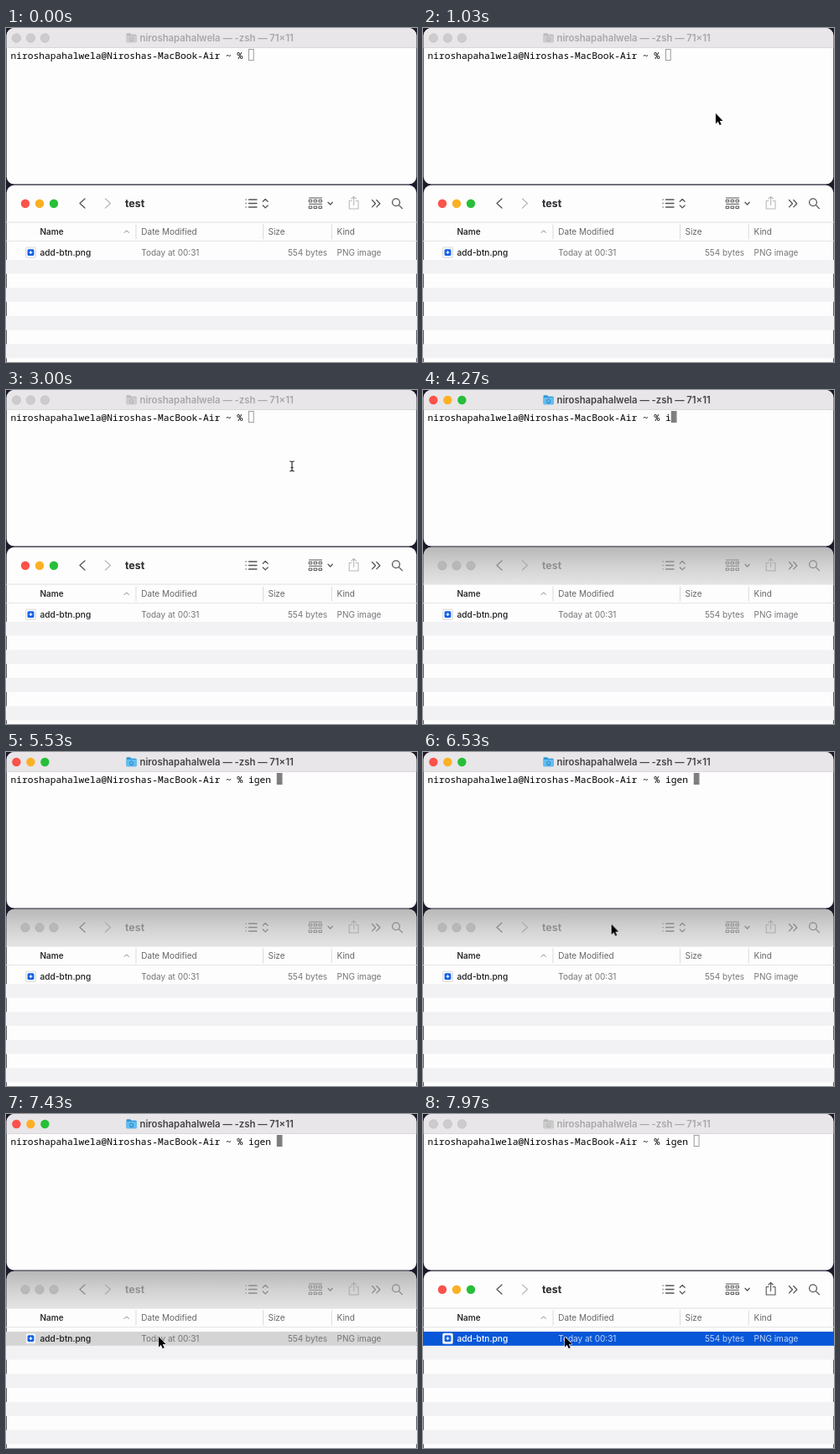
Recreate the animation shown at these times as an HTML page. Size 490 by 399 pixels, loop 8 s.

```html
<!DOCTYPE html>
<html lang="en">
<head>
<meta charset="utf-8">
<title>Terminal and file browser</title>
<style>
html, body { margin: 0; width: 100%; height: 100%; overflow: hidden; background: #1d1b2b; }
svg { display: block; width: 490px; height: 399px; }
text { font-family: Inter, Roboto, sans-serif; font-size: 10px; }
.mono { font-family: "Noto Sans Mono", "DejaVu Sans Mono", monospace; font-size: 11.25px; font-weight: 500; }
.bold { font-weight: 600; }
.line { fill: none; stroke: currentColor; stroke-width: 1.3; stroke-linecap: round; stroke-linejoin: round; }

/* every animation shares one 8 s clock with hard steps */
.term, .find, .title, .tools, .weak, .share, .caret, .grey, .blue, .name, .info, .arrow, .beam, .shown {
  animation: 8s step-end infinite;
}
.term { animation-name: term; }
.find { animation-name: find; }
.title { animation-name: title; }
.tools { animation-name: tools; }
.weak { animation-name: weak; }
.share { animation-name: share; }
.caret { animation-name: caret; }
.grey { animation-name: grey; }
.blue { animation-name: blue; }
.name { animation-name: name; }
.info { animation-name: info; }
.arrow { animation-name: arrow; }
.beam { animation-name: beam; }
.shown { animation-name: shown; }
.move { animation: move 8s linear infinite; }

@keyframes term { 0% { opacity: 0 } 40.4% { opacity: 1 } 94.6% { opacity: 0 } }
@keyframes find { 0% { opacity: 1 } 40.4% { opacity: 0 } 94.6% { opacity: 1 } }
@keyframes title { 0% { fill: #a9a7a9 } 40.4% { fill: #454345 } 94.6% { fill: #a9a7a9 } }
@keyframes tools { 0% { color: #555456 } 40.4% { color: #8c8b8c } 94.6% { color: #555456 } }
@keyframes weak { 0% { color: #b9b8ba } 40.4% { color: #adacad } 94.6% { color: #b9b8ba } }
@keyframes share { 0% { color: #b9b8ba } 40.4% { color: #adacad } 94.6% { color: #b9b8ba } 98.2% { color: #555456 } }
@keyframes caret {
  0% { transform: translateX(0) }
  52.9% { transform: translateX(6.75px) }
  55.6% { transform: translateX(13.5px) }
  57.6% { transform: translateX(20.25px) }
  60% { transform: translateX(27px) }
  63.2% { transform: translateX(33.75px) }
}
@keyframes grey { 0% { opacity: 0 } 90.6% { opacity: 1 } 94.6% { opacity: 0 } }
@keyframes blue { 0% { opacity: 0 } 94.6% { opacity: 1 } }
@keyframes name { 0% { fill: #1c1b1d } 94.6% { fill: #fff } }
@keyframes info { 0% { fill: #767577 } 94.6% { fill: #c3d6f8 } }
@keyframes arrow { 0% { opacity: 1 } 16.5% { opacity: 0 } 81% { opacity: 1 } }
@keyframes beam { 0% { opacity: 0 } 16.5% { opacity: 1 } 81% { opacity: 0 } }
@keyframes shown { 0% { opacity: 0 } 4% { opacity: 1 } 52.9% { opacity: 0 } 78% { opacity: 1 } }
@keyframes move {
  0%, 4% { transform: translate(500px, 250px); animation-timing-function: ease-out }
  10% { transform: translate(352px, 106px) }
  12.8% { transform: translate(349px, 102px) }
  22%, 78% { transform: translate(341px, 91px) }
  81.6% { transform: translate(225px, 205px); animation-timing-function: ease-out }
  87% { transform: translate(188px, 262px) }
  91.6%, 94% { transform: translate(182px, 266px) }
  99.6%, 100% { transform: translate(169px, 266px) }
}
</style>
</head>
<body>
<svg viewBox="0 0 490 399">
  <defs>
    <linearGradient id="shade" x1="0" y1="0" x2="0" y2="1">
      <stop offset="0" stop-color="#b8b7b8"/>
      <stop offset=".5" stop-color="#d2d1d2"/>
      <stop offset="1" stop-color="#e5e4e5"/>
    </linearGradient>
    <pattern id="stripes" y="276.8" width="490" height="33.6" patternUnits="userSpaceOnUse">
      <rect width="490" height="16.8" fill="#f2f1f3"/>
    </pattern>
    <clipPath id="termBox"><rect x=".7" width="488.6" height="186.6" rx="9"/></clipPath>
    <clipPath id="findBox"><rect x=".7" y="187.8" width="488.6" height="230" rx="9"/></clipPath>
    <g id="dots"><circle r="5.2"/><circle cx="17" r="5.2"/><circle cx="34" r="5.2"/></g>
    <g id="lights">
      <circle r="5.2" fill="#fb5249"/><circle cx="17" r="5.2" fill="#fbb024"/><circle cx="34" r="5.2" fill="#27bf38"/>
    </g>
    <g id="folder">
      <path d="M143.5 7.5q0-1.2 1.2-1.2h3.4l1.4 1.4h5q1.2 0 1.2 1.2v7.2q0 1.2-1.2 1.2h-9.8q-1.2 0-1.2-1.2z" fill="#3397d6"/>
      <rect x="143.5" y="9" width="12.2" height="8.3" rx="1.2" fill="#63bdf0"/>
      <path d="M147 13l2.6-2.3 2.6 2.3M148 13v2.5h3.2V13" fill="none" stroke="#267fb8" stroke-width=".9"/>
    </g>
  </defs>

  <g clip-path="url(#termBox)">
    <rect width="490" height="188" fill="#fefdfe"/>
    <rect width="490" height="23.5" fill="#e8e6e8"/>
    <rect y="23" width="490" height=".8" fill="#d5d3d5"/>
    <g class="find">
      <use href="#dots" x="12.4" y="12" fill="#cdcbcd" stroke="#bebcbe" stroke-width=".6"/>
      <use href="#folder" style="filter:grayscale(1)" opacity=".45"/>
    </g>
    <g class="term">
      <use href="#lights" x="12.4" y="12"/>
      <use href="#folder"/>
    </g>
    <text class="bold title" x="159.5" y="15.6" style="font-size:11.3px">niroshapahalwela — -zsh — 71×11</text>
    <text class="mono" x="5.5" y="36.5">niroshapahalwela@Niroshas-MacBook-Air ~ %</text>
    <text class="mono" x="289" y="36.5">igen</text>
    <g class="caret">
      <rect x="288.9" y="25" width="42" height="15" fill="#fefdfe"/>
      <rect class="find" x="289.4" y="25.4" width="5.8" height="13.2" fill="none" stroke="#929192" stroke-width=".9"/>
      <rect class="term" x="289" y="25" width="6.7" height="14" fill="#7f7e7f"/>
    </g>
  </g>

  <g clip-path="url(#findBox)">
    <rect y="187" width="490" height="212" fill="#fefdfe"/>
    <rect class="term" y="187" width="490" height="45" fill="url(#shade)"/>
    <g class="find"><use href="#lights" x="23" y="209.7"/></g>
    <g class="term"><use href="#dots" x="23" y="209.7" fill="#b9b8b9" stroke="#aaa9aa" stroke-width=".6"/></g>

    <g class="tools">
      <text class="bold" x="142" y="214" style="font-size:12.6px" fill="currentColor">test</text>
      <g class="line">
        <path d="M94 204l-6 5.5 6 5.5M384 208.3l2.6 2.7 2.6-2.7M436.5 205.5l4 4.2-4 4.2M441.8 205.5l4 4.2-4 4.2"/>
        <path d="M289.5 205h9.5M289.5 209.5h9.5M289.5 214h9.5M286 205h.1M286 209.5h.1M286 214h.1"/>
        <path d="M306.3 207.3l2.9-2.9 2.9 2.9M306.3 212l2.9 2.9 2.9-2.9"/>
        <circle cx="465" cy="208.2" r="4.4"/><path d="M468.4 211.6l4 4"/>
        <g stroke-width="1">
          <path d="M361.5 203h15M361.5 210.3h15"/>
          <path d="M361.5 205.3h3.2v2.6h-3.2zM367.4 205.3h3.2v2.6h-3.2zM373.3 205.3h3.2v2.6h-3.2zM361.5 213h3.2v2.6h-3.2zM367.4 213h3.2v2.6h-3.2zM373.3 213h3.2v2.6h-3.2z" style="stroke-width:1"/>
        </g>
      </g>
    </g>
    <path class="line weak" d="M118.5 204l6 5.5-6 5.5"/>
    <path class="line share" style="stroke-width:1.1" d="M412 206.5h-2.8v9.5h10.8v-9.5h-2.8M414.6 211.5v-10M411.9 204l2.7-2.7 2.7 2.7"/>
    <g class="find"><text class="bold" x="142" y="214" style="font-size:12.6px" fill="#353436">test</text></g>

    <rect y="231.6" width="490" height=".9" fill="#dddcde"/>
    <rect y="254.2" width="490" height=".9" fill="#e2e1e3"/>
    <path d="M155 234.5v18M306.5 234.5v18M388.3 234.5v18" stroke="#dcdbdd"/>
    <path d="M140.8 244.8l2.9-2.9 2.9 2.9" fill="none" stroke="#858486"/>
    <text class="bold" x="40.5" y="246.5" fill="#2b2a2c">Name</text>
    <g fill="#656466">
      <text x="161.3" y="246.5">Date Modified</text>
      <text x="312.5" y="246.5">Size</text>
      <text x="394.5" y="246.5">Kind</text>
    </g>

    <rect y="276.8" width="490" height="123" fill="url(#stripes)"/>
    <rect class="grey" y="260" width="490" height="16.8" fill="#d5d4d5"/>
    <rect class="blue" y="260" width="490" height="16.8" fill="#0757d8"/>
    <rect x="23.5" y="262" width="12" height="12.4" rx="1.5" fill="#f6f6f8" stroke="#d3d3d8" stroke-width=".8"/>
    <rect x="25.6" y="264.2" width="7.8" height="7.8" rx="1.5" fill="#1260e8"/>
    <path d="M29.5 266.2v3.8M27.6 268.1h3.8" stroke="#fff" stroke-width="1.1"/>
    <text class="name" x="40.5" y="271.6" style="font-weight:500;font-size:10.2px">add-btn.png</text>
    <g class="info">
      <text x="161.3" y="271.6">Today at 00:31</text>
      <text x="383" y="271.6" text-anchor="end">554 bytes</text>
      <text x="394.5" y="271.6">PNG image</text>
    </g>
  </g>

  <g class="shown"><g class="move">
    <path class="arrow" d="M0 0v12.4l2.8-2.6 1.9 4.3 2-.9-1.9-4.2h3.8z" fill="#000" stroke="#fff" stroke-width="1" paint-order="stroke"/>
    <path class="beam" d="M-2.8-6q2.4 0 2.8 1.2q.4-1.2 2.8-1.2M0-5V5M-2.8 6q2.4 0 2.8-1.2q.4 1.2 2.8 1.2M-1.5 1.8h3" fill="none" stroke="#1a191a" stroke-width="1.1"/>
  </g></g>
</svg>
</body>
</html>
```
